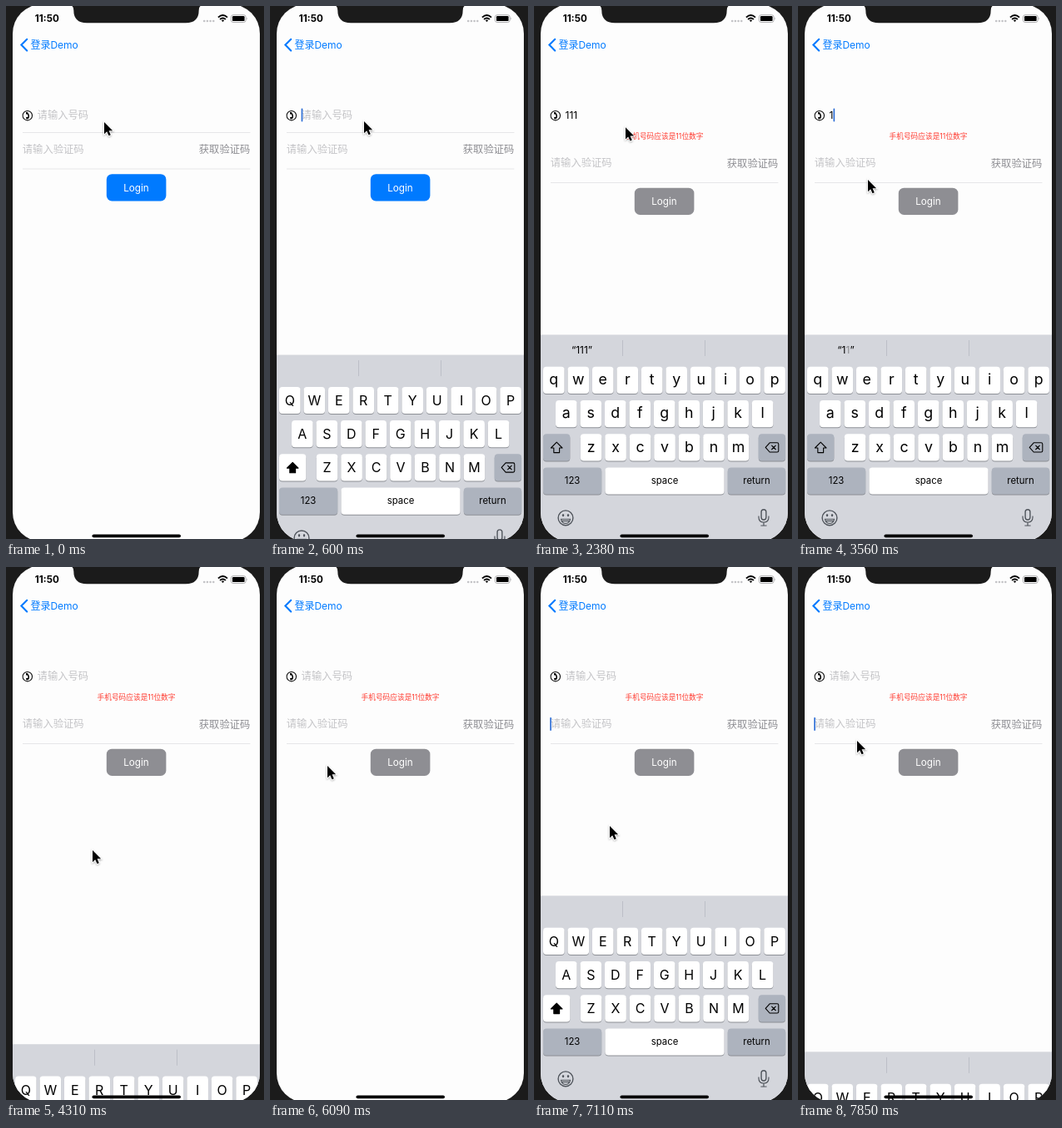
An HTML page that plays this animation: 310 px wide and 638 px high, repeating every 8 s.

```html
<!DOCTYPE html>
<html lang="zh-CN">
<head>
<meta charset="utf-8">
<style>
html, body { margin: 0; height: 100%; overflow: hidden; background: #1b1b1b }
svg { display: block; font-family: Inter, 'Noto Sans CJK SC', 'Noto Sans CJK', sans-serif }
.mid { text-anchor: middle }
.hint { fill: #c4c4c7; font-size: 12.3px }
</style>
</head>
<body>
<svg width="310" height="638" viewBox="0 0 310 638">
  <defs>
    <clipPath id="screen"><rect x="8" y="-2" width="297" height="643" rx="35"/></clipPath>
    <filter id="soft" x="-50%" y="-50%" width="200%" height="200%">
      <feDropShadow dx="0" dy="1" stdDeviation=".8" flood-opacity=".35"/>
    </filter>
  </defs>
  <g clip-path="url(#screen)">
    <rect width="310" height="638" fill="#fdfdfd"/>

    <!-- status bar -->
    <text x="49.3" y="19.2" class="mid" font-size="11.6" font-weight="700">11:50</text>
    <g fill="#c3c3c6">
      <circle cx="238.2" cy="18" r="1.3"/><circle cx="241.9" cy="18" r="1.3"/>
      <circle cx="245.6" cy="18" r="1.3"/><circle cx="249.3" cy="18" r="1.3"/>
    </g>
    <g fill="none" stroke="#000" stroke-width="1.9">
      <path d="M255 13.6Q260.5 8.6 266 13.6M257.1 16Q260.5 12.9 263.9 16"/>
      <path d="M258.8 17.2Q260.5 15.8 262.2 17.2L260.5 19Z" fill="#000" stroke="none"/>
    </g>
    <rect x="270.5" y="10.7" width="17.6" height="8.8" rx="2.4" fill="none" stroke="#a5a5a8" stroke-width=".9"/>
    <rect x="272" y="12.1" width="14.6" height="6" rx="1.2"/>
    <path d="M289 13.5q1.6 1.6 0 3.2z" fill="#a5a5a8"/>

    <!-- navigation -->
    <path d="M25.2 39.8L18.4 46.6L25.2 53.4" fill="none" stroke="#007aff" stroke-width="2.1" stroke-linecap="round"/>
    <text x="29.4" y="50.9" font-size="12" fill="#007aff">登录Demo</text>

    <!-- form -->
    <circle cx="25.8" cy="131.2" r="5.7" fill="none" stroke="#111" stroke-width="1.1"/>
    <path d="M24.4 127.6q4.4 2.2 2 7.2" fill="none" stroke="#000" stroke-width="1.5"/>
    <path d="M24 127.2h2.3v2.2h-2.3zM24.2 133h2.3v2.2h-2.3z"/>
    <text id="phoneHint" class="hint" x="37.6" y="135.2">请输入号码</text>
    <text id="phone" x="37.6" y="135.2" font-size="12"></text>
    <path id="rule" d="M20 151.5H293.5" stroke="#e6e6e8"/>
    <text id="error" class="mid" x="156.5" y="159" font-size="8.7" fill="#ff3b30">手机号码应该是11位数字</text>
    <g id="lower">
      <text class="hint" x="19.8" y="175.6">请输入验证码</text>
      <text x="293.3" y="176.4" font-size="12.3" fill="#8e8e93" text-anchor="end">获取验证码</text>
      <path d="M20 195H293.5" stroke="#e6e6e8"/>
      <rect id="button" x="120.8" y="201.2" width="71.6" height="32.3" rx="6.5"/>
      <text class="mid" x="156.5" y="221.6" font-size="11.7" fill="#fff">Login</text>
    </g>
    <rect id="caret" width="1.7" height="16" rx=".8" fill="#2f6fd6"/>

    <g id="board">
      <rect y="393.5" width="310" height="250" fill="#d4d6dc"/>
      <path d="M106.5 400V419M205.5 400V419" stroke="#bcbfc7"/>
      <text id="guess" class="mid" x="57.5" y="416" font-size="12"></text>
      <g id="keys"></g>
      <path id="shift" d="M27.2 522.2L34 529H30.6V534.6H23.8V529H20.4Z" stroke="#000" stroke-width="1.1" stroke-linejoin="round"/>
      <path d="M283.2 522.8H292.2Q293.8 522.8 293.8 524.4V532.4Q293.8 534 292.2 534H283.2L278.2 528.4ZM285.4 525.8L290.6 531M290.6 525.8L285.4 531" fill="none" stroke="#000" stroke-width="1.1" stroke-linejoin="round"/>
      <g fill="none" stroke="#50555c" stroke-width="1.4">
        <circle cx="38" cy="612.8" r="8.9"/>
        <path d="M32.4 614.2H43.6Q42.6 619.4 38 619.4T32.4 614.2ZM33.4 616.4H42.6" stroke-width="1.1"/>
        <rect x="273.1" y="602.8" width="5.8" height="12.2" rx="2.9"/>
        <path d="M270 610.4V612Q270 618 276 618T282 612V610.4M276 618V622M272.4 622H279.6" stroke-width="1.2"/>
      </g>
      <g fill="#50555c"><ellipse cx="35" cy="609.6" rx="1.2" ry="1.7"/><ellipse cx="41" cy="609.6" rx="1.2" ry="1.7"/></g>
    </g>
    <rect x="103.5" y="632.4" width="106.5" height="3.8" rx="1.9"/>
  </g>
  <path d="M76 -1Q81.3 -1 81.3 5Q81.3 20.3 97 20.3H216Q231.7 20.3 231.7 5Q231.7 -1 237 -1Z" fill="#1b1b1b"/>
  <path id="pointer" d="M0 0V14.2L3.2 11.2L5.5 16.2L7.8 15.2L5.6 10.3H10.2Z" stroke="#fff" stroke-width="1.6" paint-order="stroke" filter="url(#soft)"/>
</svg>
<script>
const $ = id => document.getElementById(id);
const LOOP = 8000, TICKS = 54;   // the screen is sampled 54 times per loop
const SHIFT = 16.5, BOARD = 245;
const GREY = '#adb3be';

// pointer stops: tick, x, y
const path = [[0, 118, 139], [1, 113, 138], [14, 113, 138], [24, 84, 208], [28, 104, 339],
  [30, 104, 339], [33, 88, 225], [34, 88, 225], [38, 64, 40], [41, 69, 238], [42, 69, 238],
  [44, 72, 188], [45, 72, 188], [48, 91, 310], [49, 91, 310], [51, 75, 193], [52, 75, 193], [53, 71, 208]];
// tick, number of digits in the phone field
const edits = [[0, 0], [6, 1], [7, 2], [9, 3], [17, 2], [24, 1], [25, 0]];
// tick, keyboard shown
const slides = [[2.6, 1], [28.09, 0], [43.6, 1], [52.01, 0]];

const letters = [];
function key(x, y, w, label, color = '#fff', size = 11.4) {
  const mid = x + w / 2;
  $('keys').insertAdjacentHTML('beforeend',
    `<rect x="${x}" y="${y + 1}" width="${w}" height="32.2" rx="4" fill="#8d9096"/>
     <rect x="${x}" y="${y}" width="${w}" height="32.2" rx="4" fill="${color}"/>
     <text class="mid" x="${mid}" y="${y + 19.6}" font-size="${size}">${label}</text>`);
  return $('keys').lastElementChild;
}
[['qwertyuiop', 11], ['asdfghjkl', 26], ['zxcvbnm', 55.8]].forEach(([row, x], r) =>
  [...row].forEach((c, i) => letters.push(key(x + i * 29.48, 431.8 + r * 40.2, 25.6, c))));
const shiftKey = key(11, 512.2, 32.3, '').previousElementSibling;
key(269.8, 512.2, 32.3, '', GREY);
key(11, 552.4, 70.2, '123', GREY);
key(85.4, 552.4, 143.2, 'space');
key(232.8, 552.4, 69.4, 'return', GREY);

const last = (list, n) => list.filter(e => e[0] <= n).pop();
const show = (id, on) => $(id).style.display = on ? '' : 'none';
const move = (id, x, y) => $(id).setAttribute('transform', `translate(${x} ${y})`);

function boardHidden(n) {
  const s = last(slides, n);
  if (!s) return 1;
  const rest = (1 - Math.min(1, (n - s[0]) / 2.6)) ** 3;
  return s[1] ? rest : 1 - rest;
}

function pointerAt(n) {
  const i = Math.max(1, path.findIndex(p => p[0] >= n));
  const [a, b] = [path[i - 1], path[i]];
  const u = (n - a[0]) / (b[0] - a[0]), e = u * u * (3 - 2 * u);
  return [a[1] + (b[1] - a[1]) * e, a[2] + (b[2] - a[2]) * e];
}

function setCase(upper) {
  for (const t of letters) {
    t.textContent = upper ? t.textContent.toUpperCase() : t.textContent.toLowerCase();
    t.setAttribute('font-size', upper ? 16 : 17.8);
    t.setAttribute('dy', upper ? 2.4 : 1.8);
  }
  shiftKey.setAttribute('fill', upper ? '#fff' : GREY);
  $('shift').setAttribute('fill', upper ? '#000' : 'none');
}

function draw(n) {
  const [since, count] = last(edits, n);
  const before = last(edits, n - 1)?.[1] || 0;
  const ones = k => '1'.repeat(k);
  const failed = n >= 6;

  $('phone').textContent = ones(count);
  show('phoneHint', !count);
  show('rule', !failed);
  show('error', failed);
  move('lower', 0, failed ? SHIFT : 0);
  $('button').setAttribute('fill', failed ? '#8e8e93' : '#007aff');

  // suggestions trail by one tick, a deleted digit fades out
  const kept = Math.min(count, before);
  $('guess').innerHTML = kept
    ? `“${ones(kept)}<tspan opacity=".35">${ones(before - kept)}</tspan>”` : '';
  setCase(!count);

  const inPhone = n >= 3 && n < 28, inCode = n >= 44;
  const start = inCode ? 44 : Math.max(3, since);
  show('caret', (inPhone || inCode) && (n - start) % 9 < 5);
  if (inCode) move('caret', 19.2, 180);
  else move('caret', 37.6 + (count ? $('phone').getComputedTextLength() : 0), 122.6);

  move('board', 0, BOARD * boardHidden(n));
  move('pointer', ...pointerAt(n));
}

function frame(now) {
  const t = now % LOOP;
  draw(Math.min(TICKS - 1, Math.floor((t + 9) * TICKS / LOOP)));
  requestAnimationFrame(frame);
}
draw(0);
requestAnimationFrame(frame);
</script>
</body>
</html>
```
